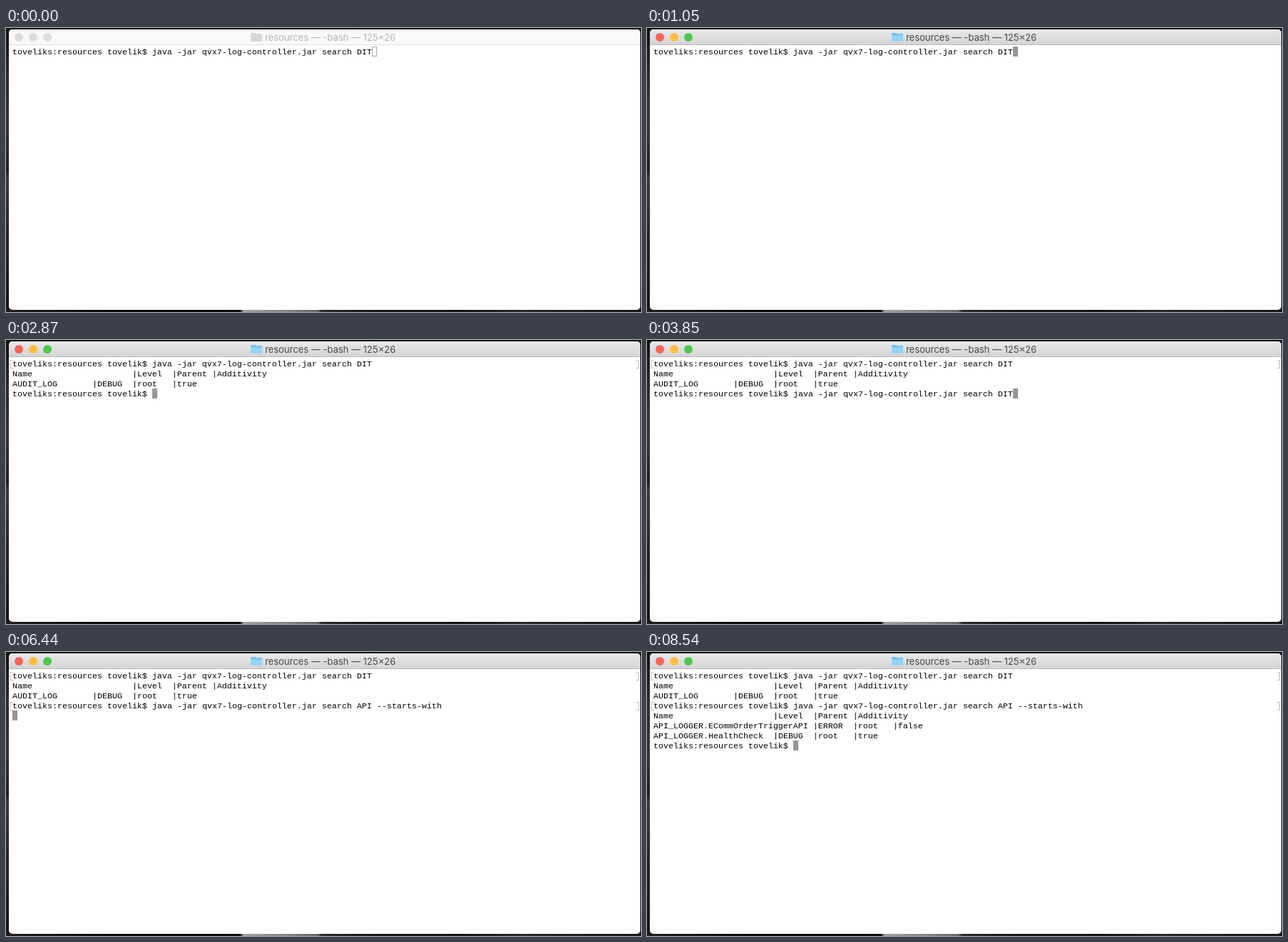
These frames come from a looping animation (890 by 398 pixels, 8.75 s). An HTML page:

```html
<!DOCTYPE html>
<html lang="en">
<head>
<meta charset="utf-8">
<title>Terminal</title>
<style>
  html, body { margin: 0; width: 100%; height: 100%; overflow: hidden; background: #141414; }
  .stage { position: relative; width: 890px; height: 398px; overflow: hidden; background: #151515; }
  .stage *, .stage { box-sizing: border-box; }

  /* Desktop peeking out around the window */
  .side, .floor { position: absolute; left: 0; }
  .side { top: 0; width: 6px; height: 398px;
    background: linear-gradient(#111 0, #2c2c2c 70px, #343434 140px, #202020 200px, #3a3a3a 208px, #262626 290px, #141414 398px); }
  .floor { top: 390px; width: 890px; height: 8px;
    background: linear-gradient(90deg, #1c1c1c 0, #0a0a0a 150px, #0c0c0c 328px, #a0a0a0 333px, #868686 390px, #6a6a6a 436px, #2c2c2c 442px, #161616 520px, #121212 640px, #2a2a2a 720px, #161616 890px); }

  .window { position: absolute; left: 4px; top: 2px; width: 885px; height: 393px;
    border-radius: 5px; overflow: hidden; background: #fff; }
  .bar { position: absolute; left: 0; top: 0; width: 100%; height: 22px;
    border-bottom: 1px solid #b9b9b9; box-shadow: inset 0 1px #f4f4f4;
    background: linear-gradient(#e9e9e9, #d4d4d4); }
  .bar.idle { border-color: #dedede; background: #f9f9f9; }

  .light { position: absolute; top: 5px; width: 12px; height: 12px; border-radius: 50%; }
  .close { left: 8px; background: #f3655e; }
  .mini { left: 28px; background: #fbbe3f; }
  .zoom { left: 48px; background: #50c551; }
  .idle .light { background: #dcdcdc; }
  .edited { position: absolute; left: 12px; top: 9px; width: 4px; height: 4px;
    border-radius: 50%; background: #5c0b08; }

  .title { position: absolute; left: 0; top: 0; width: 881px; height: 22px;
    display: flex; align-items: center; justify-content: center; gap: 4px;
    font: 13px/22px Inter, "Liberation Sans", sans-serif; color: #484848; white-space: pre; }
  .idle .title { color: #b4b4b4; }
  .folder { position: relative; flex: none; width: 16px; height: 11px; margin-top: 1px;
    border-radius: 1px; background: linear-gradient(#78c3ea 2px, #93d5f5 3px); }
  .folder::before { content: ""; position: absolute; left: 0; top: -1px; width: 7px; height: 3px;
    border-radius: 1px; background: #78c3ea; }
  .busy .folder { opacity: .5; }
  .idle .folder, .idle .folder::before { background: #d6d6d6; }

  /* Character grid: 7 by 14 px cells starting at 9,26 */
  .text { position: absolute; left: 9px; margin: 0; white-space: pre; tab-size: 8;
    font: 11.667px/14px "Liberation Mono", "DejaVu Sans Mono", monospace; color: #000; }
  .row1 { top: 27px; } .row2 { top: 41px; } .row4 { top: 69px; } .row5 { top: 83px; }
  .cmd { left: 205px; }
  .marks { position: absolute; left: 6px; width: 881px; height: 10px; }
  .marks::before, .marks::after { content: ""; position: absolute; top: 0; width: 3px; height: 10px;
    border: 1px solid #c4c4c4; }
  .marks::before { left: 0; border-right: 0; }
  .marks::after { right: 0; border-left: 0; }
  .first { top: 28px; } .second { top: 70px; }
  .cursor { position: absolute; left: 0; top: 0; width: 7px; height: 14px; background: #969696; }
  .cursor.hollow { transform: translate(513px, 26px); background: none; border: 1px solid #a8a8a8; }

  /* Hard switches */
  .on, .cursor.solid { animation: 8750ms step-end infinite; }
  .unfocused { animation-name: unfocused; }
  .plain { animation-name: plain; }
  .run1 { animation-name: run1; }
  .run2 { animation-name: run2; }
  .edited { animation-name: running; }
  .first { animation-name: enter1; }
  .out1 { animation-name: out1; }
  .recall { animation-name: recall; }
  .typed { animation-name: typed; }
  .second { animation-name: enter2; }
  .out2 { animation-name: out2; }
  .cursor.solid { animation-name: cursor; }

  @keyframes unfocused { 0% { opacity: 1 } 12%, 100% { opacity: 0 } }
  @keyframes plain { 0%, 32.8%, 84.8%, 100% { opacity: 1 } 22.4%, 75.2% { opacity: 0 } }
  @keyframes run1 { 0%, 32.8%, 100% { opacity: 0 } 22.4% { opacity: 1 } }
  @keyframes run2 { 0%, 84.8%, 100% { opacity: 0 } 75.2% { opacity: 1 } }
  @keyframes running { 0%, 32.8%, 84.8%, 100% { opacity: 0 } 22.4%, 75.2% { opacity: 1 } }
  @keyframes enter1 { 0% { opacity: 0 } 21.6%, 100% { opacity: 1 } }
  @keyframes out1 { 0% { opacity: 0 } 32%, 100% { opacity: 1 } }
  @keyframes recall { 0%, 48%, 100% { opacity: 0 } 44% { opacity: 1 } }
  @keyframes typed { 0% { opacity: 0 } 53.6%, 100% { opacity: 1 } }
  @keyframes enter2 { 0% { opacity: 0 } 73.6%, 100% { opacity: 1 } }
  @keyframes out2 { 0% { opacity: 0 } 84%, 100% { opacity: 1 } }
  @keyframes cursor {
    0% { opacity: 0; transform: translate(513px, 26px) }
    12% { opacity: 1; transform: translate(513px, 26px) }
    21.6% { opacity: 1; transform: translate(9px, 40px) }
    32%, 48% { opacity: 1; transform: translate(205px, 68px) }
    44% { opacity: 1; transform: translate(513px, 68px) }
    53.6% { opacity: 1; transform: translate(611px, 68px) }
    73.6% { opacity: 1; transform: translate(9px, 82px) }
    84%, 100% { opacity: 1; transform: translate(205px, 124px) }
  }
</style>
</head>
<body>
<div class="stage">
  <div class="side"></div>
  <div class="floor"></div>

  <div class="window">
    <div class="bar">
      <i class="light close"></i><i class="light mini"></i><i class="light zoom"></i>
      <i class="edited on"></i>
      <div class="title plain on"><i class="folder"></i><span>resources — -bash — 125×26</span></div>
      <div class="title busy run1 on"><i class="folder"></i><span>resources — java -jar qvx7-log-controller.jar search DIT — 125×26</span></div>
      <div class="title busy run2 on"><i class="folder"></i><span>resources — java -jar qvx7-log-controller.jar search API --starts-with — 125×26</span></div>
    </div>
    <div class="bar idle unfocused on">
      <i class="light close"></i><i class="light mini"></i><i class="light zoom"></i>
      <div class="title"><i class="folder"></i><span>resources — -bash — 125×26</span></div>
    </div>
  </div>

  <div class="cursor hollow unfocused on"></div>
  <div class="cursor solid"></div>
  <div class="marks first on"></div>
  <div class="marks second on"></div>

  <pre class="text row1">toveliks:resources tovelik$ java -jar qvx7-log-controller.jar search DIT</pre>
  <pre class="text row2 out1 on">Name&#9;&#9;&#9;|Level&#9;|Parent&#9;|Additivity
AUDIT_LOG&#9;|DEBUG&#9;|root&#9;|true
toveliks:resources tovelik$</pre>
  <pre class="text row4 cmd recall on">java -jar qvx7-log-controller.jar search DIT</pre>
  <pre class="text row4 cmd typed on">java -jar qvx7-log-controller.jar search API --starts-with</pre>
  <pre class="text row5 out2 on">Name&#9;&#9;&#9;|Level&#9;|Parent&#9;|Additivity
API_LOGGER.ECommOrderTriggerAPI&#9;|ERROR&#9;|root&#9;|false
API_LOGGER.HealthCheck&#9;|DEBUG&#9;|root&#9;|true
toveliks:resources tovelik$</pre>
</div>
</body>
</html>
```
